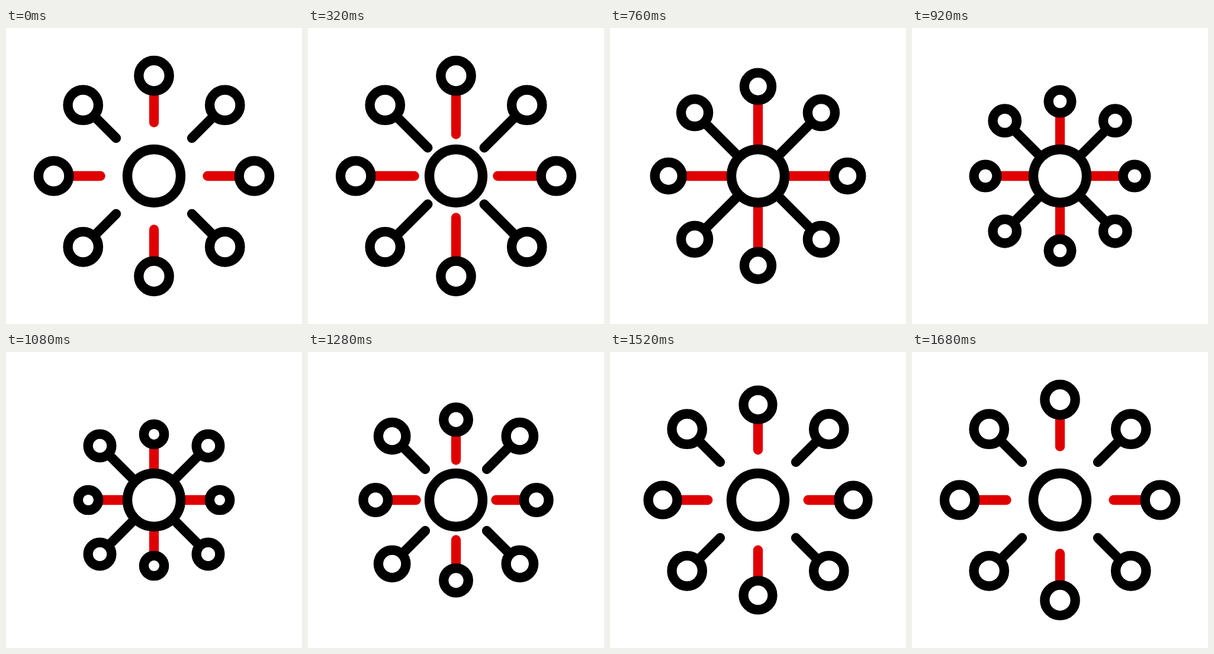
An HTML page with a canvas that plays this animation: 500x500 px, repeating every 2 s.

```html
<!DOCTYPE html>
<html lang="en">
<head>
<meta charset="utf-8">
<title>Hub and nodes</title>
<style>
  html, body { margin: 0; width: 100%; height: 100%; overflow: hidden; background: #fff; }
  canvas { display: block; width: 500px; height: 500px; }
</style>
</head>
<body>
<canvas id="stage" width="500" height="500"></canvas>
<script>
const ctx = document.getElementById('stage').getContext('2d');
const LOOP = 2000, STEP = 40;
const NODE_FAR = 169.4, TIP_FAR = 90.5, TIP_NEAR = 50.3;

// Times in ms at which each kind of spoke ends its three moves
const straight = { color: '#e00000', near: 110.8, touch: 640, pull: 1100, back: 1680 };
const diagonal = { color: '#000', near: 129.4, touch: 582, pull: 985, back: 1511 };

const span = (t, from, to) => Math.min(1, Math.max(0, (t - from) / (to - from)));
const mix = (a, b, k) => a + (b - a) * k;
const easeInOut = k => k * k * (3 - 2 * k);
const easeOut = k => 1 - (1 - k) ** 1.5;

function ring(x, radius) {
  ctx.beginPath();
  ctx.arc(x, 0, radius, 0, 2 * Math.PI);
  ctx.fillStyle = '#fff';
  ctx.fill();
  ctx.strokeStyle = '#000';
  ctx.stroke();
}

function spoke(kind, t) {
  const reach = easeInOut(span(t, 0, kind.touch));
  const pull = easeInOut(span(t, 560, kind.pull));
  const back = easeOut(span(t, 1100, kind.back));
  const tip = mix(TIP_FAR, TIP_NEAR, reach * (1 - back));
  const node = mix(NODE_FAR, kind.near, pull * (1 - back));

  ctx.beginPath();
  ctx.moveTo(tip, 0);
  ctx.lineTo(node, 0);
  ctx.strokeStyle = kind.color;
  ctx.stroke();
  ring(node, 25.7 - 0.146 * (NODE_FAR - node));
}

function draw(now) {
  const t = Math.floor(now % LOOP / STEP) * STEP;
  ctx.setTransform(1, 0, 0, 1, 0, 0);
  ctx.fillStyle = '#fff';
  ctx.fillRect(0, 0, 500, 500);
  ctx.translate(250, 250);
  ctx.lineWidth = 16.3;
  ctx.lineCap = 'round';
  for (let i = 0; i < 8; i++) {
    spoke(i % 2 ? diagonal : straight, t);
    ctx.rotate(Math.PI / 4);
  }
  ring(0, 45);
}

const start = performance.now();
function tick() {
  draw(performance.now() - start);
  requestAnimationFrame(tick);
}
tick();
</script>
</body>
</html>
```
